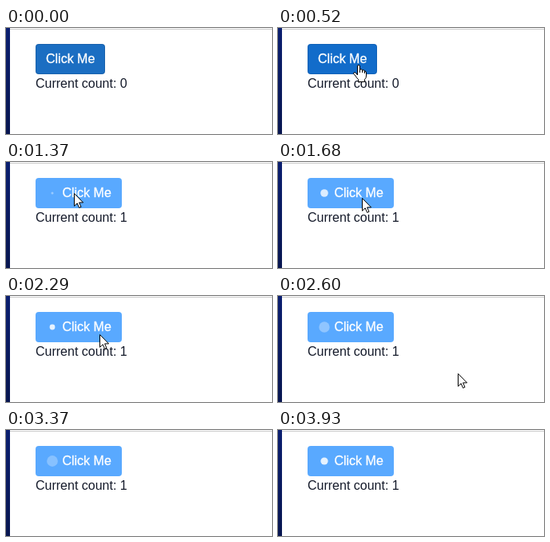
An HTML page with a canvas that plays this animation: 333 px wide and 133 px high, repeating every 4000 ms.

```html
<!DOCTYPE html>
<html lang="en">
<head>
<meta charset="utf-8">
<title>Counter button</title>
<style>
  html, body { margin: 0; width: 100%; height: 100%; overflow: hidden; background: #fff; }
  canvas { display: block; width: 333px; height: 133px; }
</style>
</head>
<body>
<canvas id="stage" width="333" height="133"></canvas>
<script>
const ctx = document.getElementById('stage').getContext('2d', { alpha: false });
const LOOP = 4000, STEPS = 52, STEP = LOOP / STEPS;
const ENTER = 150, HOVER = 480, PRESS = 1210, CLICK = 1240, LEAVE = 2730;
const FADE = 150, SPIN = 750;

const linear = k => k;
const easeIn = k => k * k;
const easeOut = k => k * (2 - k);
const smooth = k => k * k * (3 - 2 * k);
const lerp = (a, b, k) => a + (b - a) * k;
const progress = (t, from, to) => Math.min(1, Math.max(0, (t - from) / (to - from)));
const mix = (a, b, k) => `rgb(${a.map((v, i) => Math.round(lerp(v, b[i], k)))})`;

const HOME = { x: 249, y: 103 };
const MOVES = [
  { from: ENTER, to: 538, x: 100, y: 46, ease: linear },
  { from: 538, to: 654, x: 85, y: 39, ease: easeOut },
  { from: 1480, to: 1842, x: 117, y: 48, ease: smooth },
  { from: 2307, to: 2692, x: 285, y: 125, ease: easeIn },
];

const ARROW = new Path2D('M.5 .5V16.3L4.2 12.8L6.6 18.4L9 17.4L6.6 11.9H11.6Z');
const HAND = new Path2D('M5.5 13V2Q5.5 .5 7 .5Q8.5 .5 8.5 2V6Q11.5 5 11.5 7Q14.5 6.2 14.5 8Q16.5 8 16.5 10' +
  'V14Q16.5 17 14.5 18.5V21.5H6.5V18.5Q4 16 3 14L.5 11.5Q.5 9.5 2.5 9.8Q4 10.5 5.5 13Z');
const KNUCKLES = new Path2D('M8.5 6V10M11.5 7V10M14.5 8V11');

const BASE = { fill: [27, 110, 194], edge: [24, 97, 172] };
const OVER = { fill: [0, 105, 217], edge: [0, 98, 204] };
const BUSY = { fill: [0, 123, 255], edge: [0, 123, 255] };

// The screen refreshes in even steps, each a little early.
const snap = t => Math.min(STEPS - 1, Math.floor(t / STEP + 0.3)) * STEP;

function pointerAt(t) {
  return MOVES.reduce((p, m) => {
    const k = m.ease(progress(t, m.from, m.to));
    return { x: lerp(p.x, m.x, k), y: lerp(p.y, m.y, k) };
  }, HOME);
}

function disc(x, y, r, color) {
  ctx.fillStyle = color;
  ctx.beginPath();
  ctx.arc(x, y, r, 0, Math.PI * 2);
  ctx.fill();
}

function box(x, y, w, h, r, color) {
  ctx.fillStyle = color;
  ctx.beginPath();
  ctx.roundRect(x, y, w, h, r);
  ctx.fill();
}

function text(str, x, y, color) {
  ctx.fillStyle = color;
  ctx.fillText(str, x, y);
}

function drawPage() {
  ctx.fillStyle = '#fff';
  ctx.fillRect(0, 0, 333, 133);
  const side = ctx.createLinearGradient(0, 0, 0, 133);
  side.addColorStop(0, '#0b1f70');
  side.addColorStop(1, '#081650');
  ctx.fillStyle = side;
  ctx.fillRect(0, 0, 5, 133);
  ctx.fillStyle = '#cbcbcb';
  ctx.fillRect(5, 1, 328, 1);
}

function drawSpinner(t) {
  const p = (t - CLICK) / SPIN % 1;
  disc(58, 39, 8 * p, `rgba(255,255,255,${1 - Math.abs(2 * p - 1)})`);
}

function drawButton(t, busy) {
  const [a, b, start] = busy ? [OVER, BUSY, CLICK] : [BASE, OVER, HOVER];
  const k = smooth(progress(t, start, start + FADE));
  const w = busy ? 108 : 87;
  ctx.globalAlpha = busy ? 0.65 : 1;
  box(37, 20, w, 38, 4, mix(a.edge, b.edge, k));
  ctx.globalAlpha = 1;
  if (busy) drawSpinner(t);
  else box(38, 21, w - 2, 36, 3, mix(a.fill, b.fill, k));

  const x = busy ? 70.45 : 50;
  text('Click Me', x, 44, '#fff');
  ctx.strokeStyle = '#fff';
  ctx.lineWidth = 0.3;
  ctx.strokeText('Click Me', x, 44);
}

function drawPointer(t, busy) {
  if (t < ENTER || t >= LEAVE) return;
  const { x, y } = pointerAt(t);
  const hand = t >= HOVER && !busy;
  const shape = hand ? HAND : ARROW;
  ctx.save();
  ctx.translate(Math.round(x) - (hand ? 6 : 0), Math.round(y));
  ctx.fillStyle = '#fff';
  ctx.strokeStyle = '#000';
  ctx.lineWidth = 1;
  ctx.fill(shape);
  ctx.stroke(shape);
  if (hand) ctx.stroke(KNUCKLES);
  ctx.restore();
}

function draw(time) {
  const t = snap(time % LOOP);
  const busy = t >= CLICK;
  ctx.font = '16px "Liberation Sans", Arial, sans-serif';
  drawPage();
  drawButton(t, busy);
  text('Current count: ' + (busy ? 1 : 0), 37, 75, '#141a2a');
  if (t >= PRESS && !busy) disc(84.5, 39, 12, 'rgba(255,255,0,.5)');
  drawPointer(t, busy);
}

let start;
function tick(now) {
  start ??= now;
  draw(now - start);
  requestAnimationFrame(tick);
}
draw(0);
requestAnimationFrame(tick);
</script>
</body>
</html>
```
